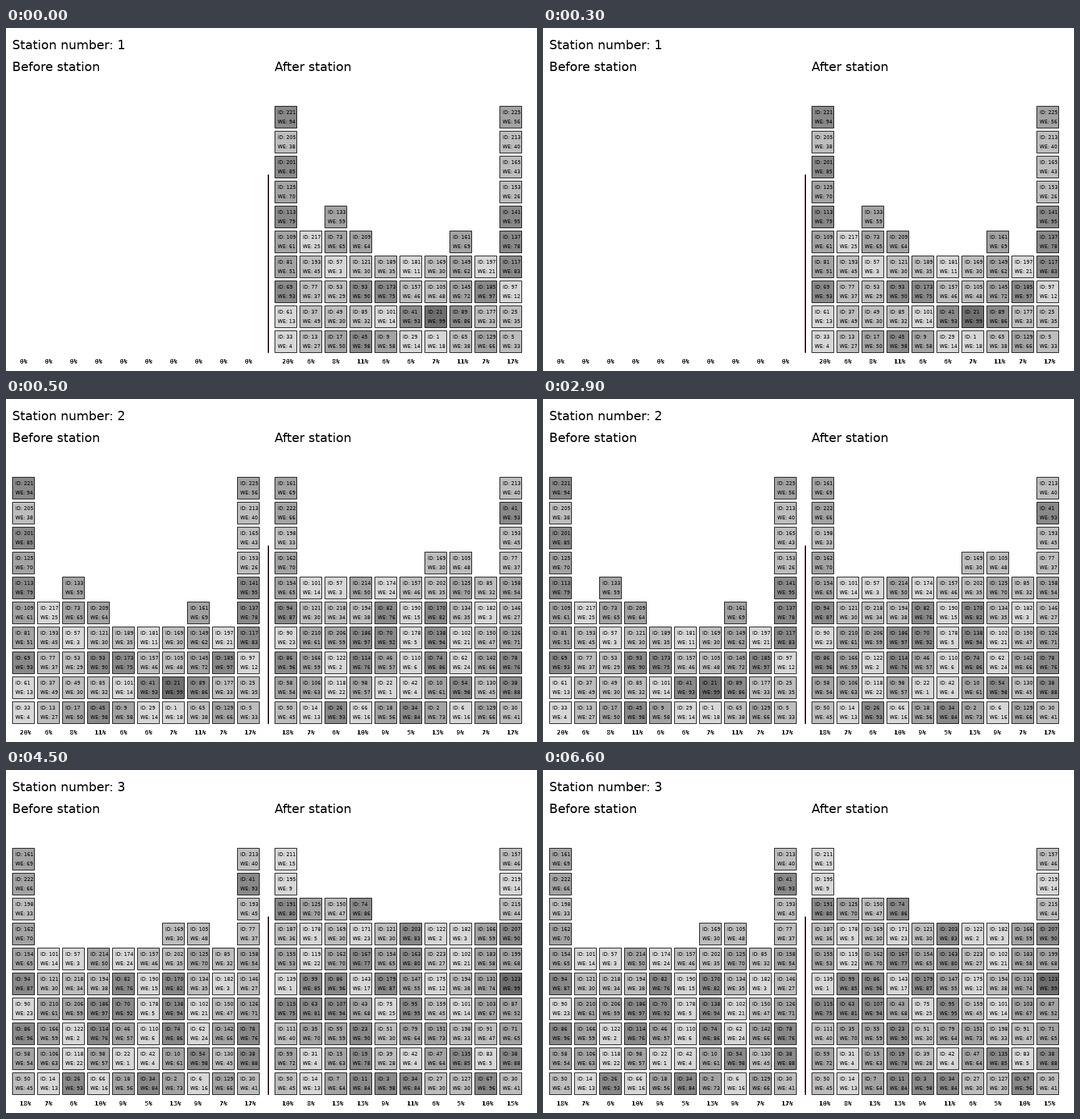
These frames come from a looping animation (850x550 px, 8 s). A matplotlib script:

```python
import random

import matplotlib.pyplot as plt
from matplotlib.animation import FuncAnimation
from matplotlib.patches import Rectangle

W, H, DPI = 850, 550, 100
PT = 72 / DPI  # points per pixel
LAST_ID = 225
STEP = 40  # distance between neighbouring boxes

# Column heights after each station, left to right.
HEIGHTS = [
    [10, 5, 6, 5, 4, 4, 4, 5, 4, 10],
    [10, 6, 6, 6, 6, 6, 7, 7, 6, 10],
    [10, 8, 8, 8, 7, 7, 7, 7, 7, 10],
]

plt.rcParams.update({
    "font.family": "DejaVu Sans",
    "text.hinting": "default",
    "text.hinting_factor": 8,
})

rng = random.Random(1)
weight = {box: rng.randint(1, 99) for box in range(1, LAST_ID + 1)}


def visit(columns, n, heights):
    """Unload some boxes, load the new ones, then put lifted ones back on top."""
    new = list(range(n, LAST_ID + 1, 4))
    aboard = [box for col in columns for box in col]
    kept = set(rng.sample(aboard, sum(heights) - len(new)))

    result, lifted = [], []
    for col in columns:
        # Only boxes below the lowest leaving one can stay in place.
        base = next((i for i, box in enumerate(col) if box not in kept), len(col))
        result.append(col[:base])
        lifted += [box for box in col[base:] if box in kept]

    slots = [c for c, h in enumerate(heights) for _ in range(h - len(result[c]))]
    rng.shuffle(slots)
    for c, box in zip(slots, new + lifted):
        result[c].append(box)
    return result


states = [[[] for _ in range(10)]]
for n, heights in enumerate(HEIGHTS, 1):
    states.append(visit(states[-1], n, heights))

fig = plt.figure(figsize=(W / DPI, H / DPI), dpi=DPI, facecolor="white")
ax = fig.add_axes([0, 0, 1, 1])
ax.set_xlim(0, W)
ax.set_ylim(H, 0)
ax.axis("off")


def label(x, y, text, size, **kw):
    return ax.text(x, y, text, fontsize=size * PT, color="black",
                   va="baseline", ha="left", **kw)


def shade(w):
    level = (w - 1) * 4 // 98
    return str((215 - 26 * level) / 255)


def draw_box(x, y, box):
    w = weight[box]
    rect = Rectangle((x + 0.5, y + 0.5), 35, 35, facecolor=shade(w),
                     edgecolor="black", linewidth=PT, snap=False)
    ax.add_patch(rect)
    return [rect,
            label(x + 5, y + 13, f"ID: {box}", 8),
            label(x + 5, y + 28, f"WE: {w}", 8)]


def draw_side(left, columns):
    sums = [sum(weight[box] for box in col) for col in columns]
    total = sum(sums) or 1
    parts = []
    for c, col in enumerate(columns):
        x = left + STEP * c
        for row, box in enumerate(col):
            parts += draw_box(x, 485 - STEP * row, box)
        parts.append(label(x + 12, 538, f"{sums[c] / total:.0%}", 10,
                           family="DejaVu Sans Mono", weight="bold",
                           antialiased=False))
    return parts


def draw_station(n):
    return ([label(10, 34, f"Station number: {n}", 20)]
            + draw_side(10, states[n - 1])
            + draw_side(430, states[n]))


label(10, 69, "Before station", 20)
label(430, 69, "After station", 20)
ax.add_patch(Rectangle((419, 235), 2, 286, facecolor="#280008", linewidth=0))

stations = {n: draw_station(n) for n in (1, 2, 3)}


def update(i):
    t = i * 500
    current = 1 if t < 500 else 2 if t < 4500 else 3
    for n, parts in stations.items():
        for part in parts:
            part.set_visible(n == current)
    return []


update(0)
anim = FuncAnimation(fig, update, frames=16, interval=500, repeat=True,
                     repeat_delay=0, blit=False)
plt.show()
```
